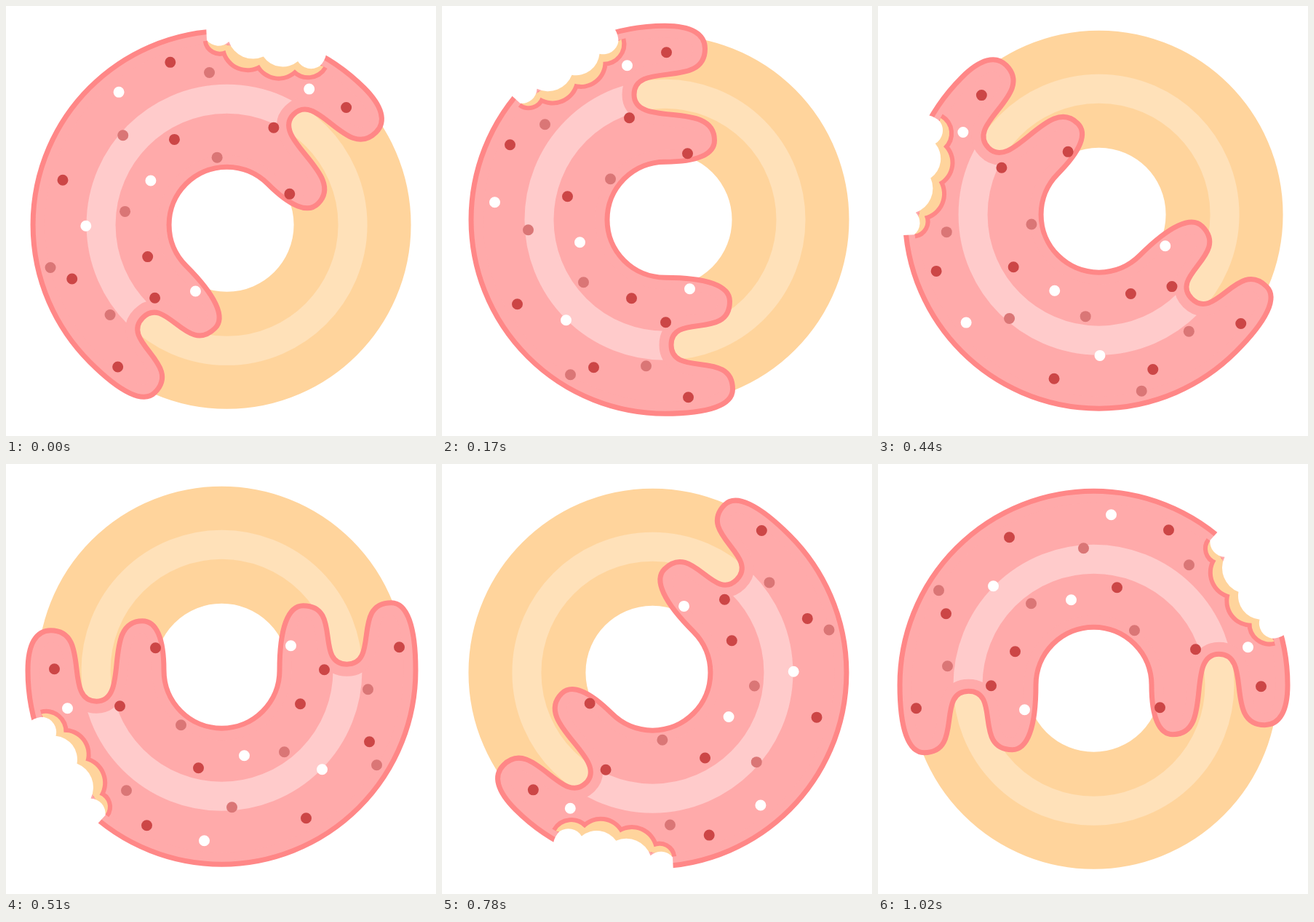
Recreate the animation shown at these times as an HTML page with a canvas. Size 591 by 591 pixels, loop 1.19 s.

```html
<!DOCTYPE html>
<html lang="en">
<head>
<meta charset="utf-8">
<title>Rolling donut</title>
<style>
  html, body { margin: 0; width: 100%; height: 100%; overflow: hidden; background: #fff; }
  canvas { display: block; width: 591px; height: 591px; }
</style>
</head>
<body>
<canvas id="stage" width="591" height="591"></canvas>
<script>
const ctx = document.getElementById('stage').getContext('2d');
const SIZE = 591, STEP = 170, STEPS = 7;
const TAU = Math.PI * 2;
const CX = 296, CY = 304;
const PIVOT_X = 296.5, PIVOT_Y = 293.7, SWING = 10;
const OUTER = 266.5, INNER = 79.5;

const color = {
  dough: '#ffd49c', doughShine: '#ffe1b9',
  icing: '#ffaaaa', icingShine: '#ffcbcb', rim: '#ff8787',
  dark: '#cc4646', muted: '#da7676', paper: '#ffffff'
};

// From the upright side of a ring round to a drip's tip, or back.
function corner(path, side, tip, toTip) {
  const k = 0.65;
  const a = [side[0], side[1] + k * (tip[1] - side[1])];
  const b = [tip[0] + k * (side[0] - tip[0]), tip[1]];
  if (toTip) path.bezierCurveTo(...a, ...b, ...tip);
  else path.bezierCurveTo(...b, ...a, ...side);
}

// Two neighbouring drips, joined by a notch.
function drips(path, from, tip1, notch, tip2, to) {
  const reach = (a, b, k) => [a[0] + k * (b[0] - a[0]), a[1]];
  corner(path, from, tip1, true);
  path.bezierCurveTo(...reach(tip1, notch, 0.9), ...reach(notch, tip1, 0.75), ...notch);
  path.bezierCurveTo(...reach(notch, tip2, 0.75), ...reach(tip2, notch, 0.9), ...tip2);
  corner(path, to, tip2, false);
}

function makeIcing() {
  const path = new Path2D();
  const at = x => [CX + x, CY];
  path.arc(CX, CY, OUTER, Math.PI, TAU);
  drips(path, at(OUTER), [531, 359], [468, 261.5], [405, 372], at(INNER));
  path.arc(CX, CY, INNER, 0, Math.PI, true);
  drips(path, at(-INNER), [184, 393], [124, 312.5], [63, 397], at(-OUTER));
  path.closePath();
  return path;
}

// Tooth marks: an arc over each gap, its radius a share of the gap.
function scallops(points, share) {
  return points.map(([x, y], i) => {
    if (!i) return `M${x} ${y}`;
    const r = share * Math.hypot(x - points[i - 1][0], y - points[i - 1][1]);
    return `A${r} ${r} 0 0 0 ${x} ${y}`;
  }).join(' ');
}

const icing = makeIcing();
const crumb = new Path2D(
  scallops([[456, 106], [464, 133], [483, 180], [513, 219], [544, 244]], 0.62));
const bite = new Path2D(
  scallops([[456, 105], [476, 128], [495, 176], [524, 214], [541, 240]], 0.68) +
  'Q550 240 558 235 L620 200 L500 60 L466 94 Z');

function ring(inner, outer, stroke) {
  ctx.beginPath();
  ctx.arc(CX, CY, (inner + outer) / 2, 0, TAU);
  ctx.lineWidth = outer - inner;
  ctx.strokeStyle = stroke;
  ctx.stroke();
}

function outline(path, width, stroke) {
  ctx.lineWidth = width;
  ctx.strokeStyle = stroke;
  ctx.stroke(path);
}

function fill(path, style) {
  ctx.fillStyle = style;
  ctx.fill(path);
}

function sprinkle(style, ...spots) {
  ctx.fillStyle = style;
  for (const [x, y] of spots) {
    ctx.beginPath();
    ctx.arc(x, y, 7.5, 0, TAU);
    ctx.fill();
  }
}

function drawDough() {
  ring(92, 253, color.dough);
  ring(153, 193, color.doughShine);
}

function drawIcing() {
  fill(icing, color.icing);
  ctx.save();
  ctx.clip(icing);
  ring(153, 193, color.icingShine);
  outline(icing, 33, color.icing); // the shine stops short of the edge
  ctx.restore();
  outline(icing, 7, color.rim);
}

function drawSprinkles() {
  sprinkle(color.dark, [180, 101], [399, 91], [328, 170], [93, 206], [188, 258],
    [155, 305], [52, 336], [436, 255], [387, 335], [526, 306]);
  sprinkle(color.muted, [282, 116], [427, 139], [83, 174], [210, 192], [352, 229], [95, 278]);
  sprinkle(color.paper, [320, 70], [158, 168], [265, 187], [508, 252], [201, 338]);
}

function drawBite() {
  outline(crumb, 12, color.rim);
  fill(crumb, color.dough);
  fill(bite, color.paper);
}

function draw(time) {
  const step = Math.floor(time / STEP) % STEPS;
  const eighths = step < STEPS - 1 ? step + 1 : 0; // the last step turns twice as far
  ctx.fillStyle = color.paper;
  ctx.fillRect(0, 0, SIZE, SIZE);
  ctx.save();
  ctx.translate(PIVOT_X, PIVOT_Y);
  ctx.rotate(-eighths * TAU / 8);
  ctx.translate(-CX, SWING - CY);
  drawDough();
  drawIcing();
  drawSprinkles();
  drawBite();
  ctx.restore();
}

const start = performance.now();
function tick() {
  draw(performance.now() - start);
  requestAnimationFrame(tick);
}
tick();
</script>
</body>
</html>
```
